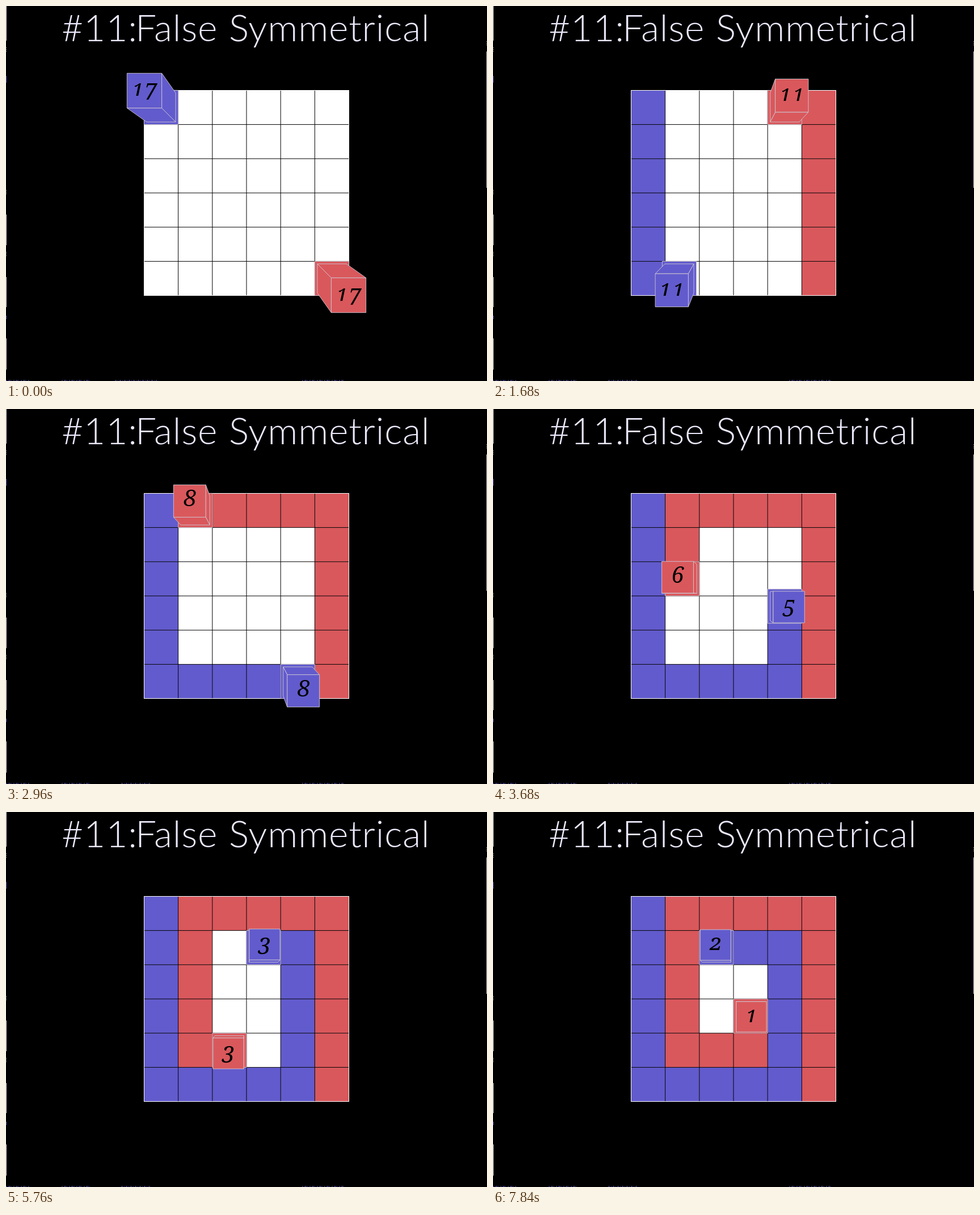
Write an HTML page that moves like this. It is 848x660 px and loops after 8 s.

```html
<!DOCTYPE html>
<html lang="en">
<head>
<meta charset="utf-8">
<title>False Symmetrical</title>
<style>
html, body { margin: 0; width: 100%; height: 100%; overflow: hidden; background: #000; }
svg { display: block; width: 848px; height: 660px; }
.title { font: 300 66px Lato, sans-serif; letter-spacing: .8px; fill: #ebe8fb; }
.num {
  font: italic 500 40px "Noto Serif", "Liberation Serif", serif;
  font-variant-numeric: oldstyle-nums;
  text-anchor: middle;
}
.piece path { stroke: #cfc8d2; stroke-width: .9; stroke-linejoin: round; }
.grid { stroke: #000; }
.edge { fill: none; stroke: #d8d2dc; }
.violet { stroke: #5a54b8; }
</style>
</head>
<body>
<svg id="stage" viewBox="0 0 848 660">
  <g class="title">
    <text x="98" y="62">#11:</text>
    <text x="228" y="62">False</text>
    <text x="393" y="62">Symmetrical</text>
  </g>
  <path class="edge" d="M.5 0V61M.5 367V421M.5 477V530M.5 585V640M847.5 80V320"/>
  <path class="edge" stroke-dasharray="1 2" d="M.5 73V81M.5 324V333M.5 433V441M847.5 62V70"/>
  <path class="edge violet" d="M.5 123V135M.5 545V551"/>
  <path class="edge violet" stroke-dasharray="2 2 4 1 1 3" d="M0 659H43M98 659H150M522 659H595"/>
  <path class="edge violet" stroke-dasharray="3 2 1 2" id="strip"/>
  <rect x="243" y="148" width="362" height="362" fill="#fff"/>
</svg>
<script>
const LOOP = 8000, STEP = 80;
const N = 6, CELL = 60.2, LEFT = 243.4, TOP = 148.4, CX = 424, CY = 329;
const INSET = 4.5, START = 17;
const stage = document.getElementById('stage');
const strip = document.getElementById('strip');

// [time, number of moves made so far]
const pace = [[190, 0], [727, 5], [1692, 12], [2960, 18], [4160, 25], [4550, 26],
  [5220, 26], [5700, 28], [5770, 28], [6070, 29], [6820, 29], [7670, 31]];

function add(name, attrs, parent = stage) {
  const el = document.createElementNS('http://www.w3.org/2000/svg', name);
  for (const k in attrs) el.setAttribute(k, attrs[k]);
  return parent.appendChild(el);
}

// Every cell on a route given by its corners
function walk(corners) {
  const cells = [corners[0]];
  for (const [x, y] of corners.slice(1)) {
    let [a, b] = cells[cells.length - 1];
    while (a !== x || b !== y) {
      a += Math.sign(x - a);
      b += Math.sign(y - b);
      cells.push([a, b]);
    }
  }
  return cells;
}

const lineX = i => LEFT + CELL * i;
const lineY = i => TOP + CELL * i;

const cells = [];
for (let r = 0; r < N; r++) for (let c = 0; c < N; c++) {
  cells.push(add('rect', { x: lineX(c), y: lineY(r), width: CELL, height: CELL }));
}
for (let i = 1; i < N; i++) {
  add('path', { class: 'grid', d: `M${lineX(i)} 149V509M244 ${lineY(i)}H604` });
}
add('rect', { x: 243.5, y: 148.5, width: 361, height: 361, fill: 'none', stroke: '#fff' });

function makePiece(color, corners) {
  const g = add('g', { class: 'piece', fill: color });
  const paths = Array.from({ length: 6 }, () => add('path', {}, g));
  return { color, route: walk(corners), paths, label: add('text', { class: 'num', fill: '#000' }, g) };
}
const red = makePiece('#d9585c', [[5, 5], [5, 0], [1, 0], [1, 4], [3, 4], [3, 3]]);
const blue = makePiece('#625bcd', [[0, 0], [0, 5], [4, 5], [4, 1], [2, 1]]);

// Turn order follows the Thue-Morse sequence
function isBlueTurn(m) {
  let odd = 0;
  for (; m; m >>= 1) odd ^= m & 1;
  return odd === 1;
}

function movesAt(t) {
  if (t <= pace[0][0]) return 0;
  for (let i = 1; i < pace.length; i++) {
    const [t0, m0] = pace[i - 1], [t1, m1] = pace[i];
    if (t < t1) return m0 + (m1 - m0) * (t - t0) / (t1 - t0);
  }
  return pace[pace.length - 1][1];
}

const poly = pts => 'M' + pts.map(p => p[0].toFixed(2) + ' ' + p[1].toFixed(2)).join('L') + 'Z';
const square = (x0, y0, x1, y1) => [[x0, y0], [x1, y0], [x1, y1], [x0, y1]];

function drawPiece(p, pos) {
  const from = Math.floor(pos), f = pos - from;
  const a = p.route[from], b = p.route[Math.ceil(pos)];
  const x = lineX(a[0] + (b[0] - a[0]) * f);
  const y = lineY(a[1] + (b[1] - a[1]) * f);
  const n = START - Math.ceil(pos);
  const scale = 1.033 + .0096 * n;

  const base = square(x + INSET, y + INSET, x + CELL - INSET, y + CELL - INSET);
  const front = base.map(([u, v]) => [CX + (u - CX) * scale, CY + (v - CY) * scale]);
  const seen = [base[0][1] > CY, base[1][0] < CX, base[2][1] < CY, base[0][0] > CX];

  p.paths[0].setAttribute('d', poly(square(x, y, x + CELL, y + CELL)));
  seen.forEach((on, i) => {
    const j = (i + 1) % 4;
    p.paths[i + 1].setAttribute('d', on ? poly([base[i], base[j], front[j], front[i]]) : '');
  });
  p.paths[5].setAttribute('d', poly(front));

  p.label.textContent = n;
  p.label.setAttribute('x', (front[0][0] + front[2][0]) / 2 + .5);
  p.label.setAttribute('y', (front[0][1] + front[2][1]) / 2 + 9.5);

  for (const [c, r] of p.route.slice(0, Math.ceil(pos))) {
    cells[r * N + c].setAttribute('fill', p.color);
  }
}

function draw(now) {
  const t = Math.floor(now % LOOP / STEP) * STEP;
  const moves = movesAt(t);
  let redPos = 0, bluePos = 0;
  for (let m = 0; m < moves; m++) {
    const part = Math.min(1, moves - m);
    if (isBlueTurn(m)) bluePos += part; else redPos += part;
  }
  for (const cell of cells) cell.setAttribute('fill', '#fff');
  drawPiece(red, redPos);
  drawPiece(blue, bluePos);
  strip.setAttribute('d', t < 1120 ? 'M192 659H266' : 'M203 659H256');
}

const begin = performance.now();
function tick() {
  draw(performance.now() - begin);
  requestAnimationFrame(tick);
}
tick();
</script>
</body>
</html>
```
